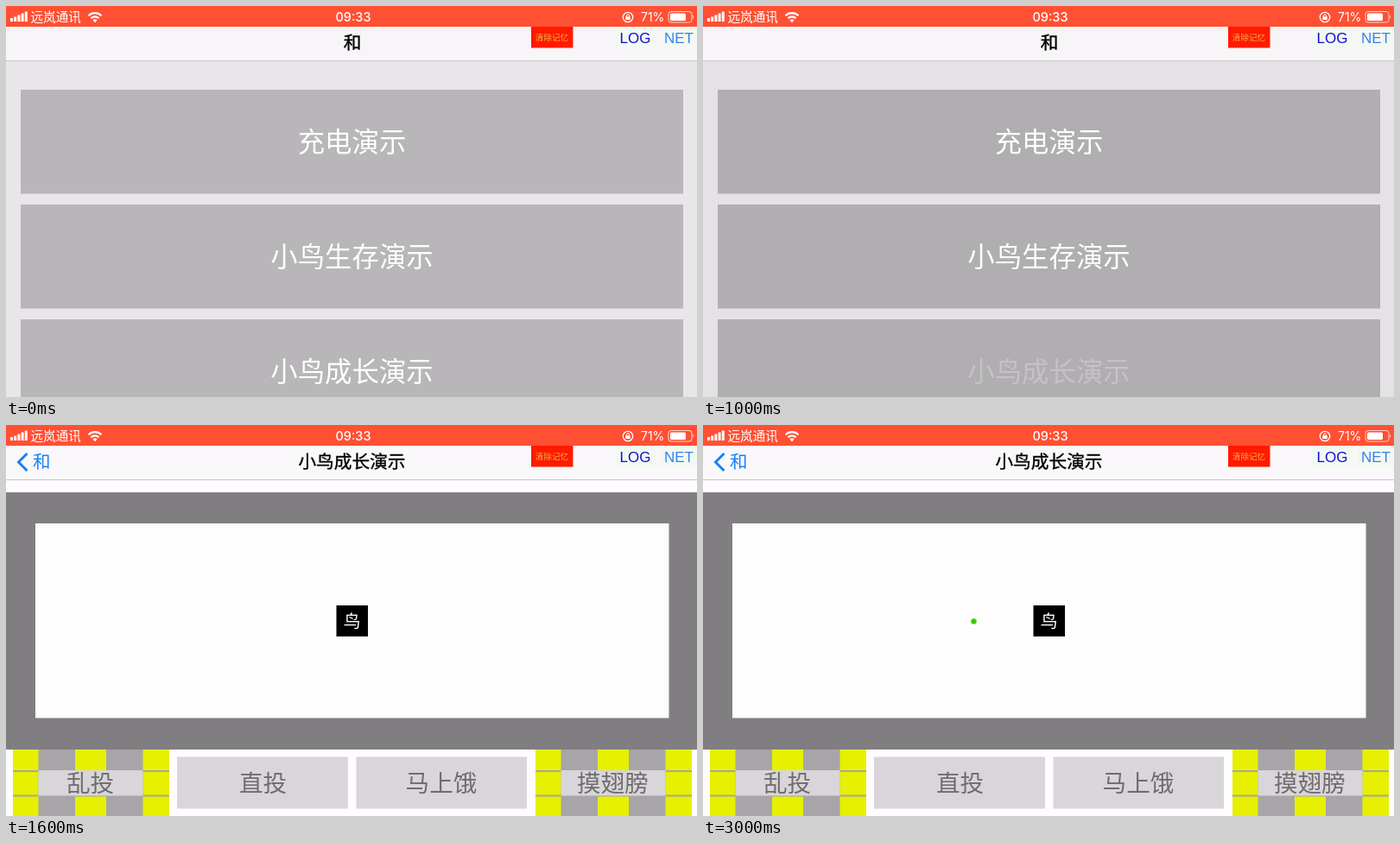
An HTML page for the animation above (8000 ms loop, 800x453 px).

```html
<!DOCTYPE html>
<html lang="zh">
<head>
<meta charset="utf-8">
<title>小鸟成长演示</title>
<style>
  html, body { margin: 0; width: 100%; height: 100%; overflow: hidden; background: #fefcfe; }
  svg { display: block; width: 100%; height: 100%; }
  text { font-family: "Noto Sans CJK SC", "Noto Sans CJK", sans-serif; }
  .mid text, text.mid { text-anchor: middle; }
  .title { font-size: 20.7px; stroke: #000; stroke-width: .35px; }
  .status { font-family: Inter, "Liberation Sans", sans-serif; fill: #fff; }
  .tool { font: 17px "Liberation Sans", sans-serif; }
  .rows text { font-size: 31.4px; fill: #fff; }
  .bar text { font-size: 27.6px; fill: #706c70; }

  .home, .backdrop, .rows, .pressed, .dim, .homeTitle,
  .detail, .detailNav, .detailTitle, .backLabel, .seed {
    animation: 8s step-end infinite;
  }
  .home { animation-name: slideHome; }
  .backdrop { fill: #e8e6e8; animation-name: backdrop; }
  .rows { fill: #b8b6b8; animation-name: rowTone; }
  .rows .pressed { animation-name: press; }
  .dim { animation-name: appear; }
  .homeTitle { animation-name: vanish; }
  .detail { animation-name: appear, slideDetail; }
  .detailNav { animation-name: appear; }
  .detailTitle { animation-name: slideTitle; }
  .backLabel { animation-name: slideBack; }
  .seed { animation-name: throwSeed; }

  @keyframes slideHome { 0% { transform: none; } 15% { transform: translateX(-216px); } }
  @keyframes backdrop { 0% { fill: #e8e6e8; } 12.5%, 100% { fill: #e4e2e4; } }
  @keyframes rowTone { 0% { fill: #b8b6b8; } 12.5%, 100% { fill: #b0aeb0; } }
  @keyframes press { 0% { fill: #fff; } 12.5%, 100% { fill: #c4c2c4; } }
  @keyframes appear { 0% { visibility: hidden; } 15%, 100% { visibility: visible; } }
  @keyframes vanish { 0% { visibility: visible; } 15%, 100% { visibility: hidden; } }
  @keyframes slideDetail { 0%, 15% { transform: translateX(80px); } 17.5%, 100% { transform: none; } }
  @keyframes slideTitle { 0%, 15% { transform: translateX(48px); } 17.5%, 100% { transform: none; } }
  @keyframes slideBack { 0%, 15% { transform: translateX(39px); } 17.5%, 100% { transform: none; } }
  @keyframes throwSeed {
    0% { visibility: hidden; transform: translate(309px, 287px); }
    35% { visibility: visible; transform: translate(309px, 287px); }
    37.5%, 100% { visibility: visible; transform: translate(313.5px, 227.5px); }
  }
</style>
</head>
<body>
<svg viewBox="0 0 800 453" preserveAspectRatio="none">
  <defs>
    <g id="checker">
      <path fill="#a8a5a8" d="M8 376h181v77H8z"/>
      <path fill="#e6f000" d="M8 376h29.5v24H8zm72 0h36v24H80zm78.500 0h30.500v24h-30.500zM8 402h29.500v26.500H8zm150.500 0h30.500v26.500h-30.500zM8 430.500h29.500V453H8zm72 0h36V453H80zm78.500 0h30.500V453h-30.500z"/>
      <path fill="#d8d6d8" d="M37.500 400h121v29.500h-121z"/>
    </g>
  </defs>

  <rect class="backdrop" width="800" height="453"/>
  <g class="home">
    <g class="rows mid">
      <rect x="17" y="97" width="767" height="120.500"/>
      <rect x="17" y="230" width="767" height="120.500"/>
      <rect x="17" y="363" width="767" height="120.500"/>
      <text x="400.500" y="168.500">充电演示</text>
      <text x="400.500" y="301.500">小鸟生存演示</text>
      <text class="pressed" x="400.500" y="434.500">小鸟成长演示</text>
    </g>
  </g>
  <rect class="dim" y="64" width="800" height="389" opacity=".09"/>

  <g class="detail">
    <path fill="#fefcfe" d="M-2 64h804v389H-2z"/>
    <path fill="#817e81" d="M-2 78h804v298H-2z"/>
    <path fill="#fefdfe" d="M34 114h733.500v225.500H34z"/>
    <path d="M382.500 209H419v36h-36.500z"/>
    <text class="mid" x="400.500" y="234.500" font-size="20" fill="#fff">鸟</text>
    <circle class="seed" r="3.200" fill="#3c0"/>
    <g class="bar mid">
      <use href="#checker"/>
      <use href="#checker" x="605"/>
      <path fill="#d8d6d8" d="M198 384.500h198v60H198zm207.500 0h197.500v60H405.500z"/>
      <text x="97.500" y="425">乱投</text>
      <text x="297.500" y="425">直投</text>
      <text x="504" y="425">马上饿</text>
      <text x="702.500" y="425">摸翅膀</text>
    </g>
  </g>

  <path fill="#f7f5f7" d="M0 24h800v39H0z"/>
  <path fill="#c9c6c9" d="M0 63h800v1H0z"/>
  <text class="title mid homeTitle" x="401" y="50">和</text>
  <g class="detailNav">
    <path fill="#faf8fa" d="M0 24h800v39H0z"/>
    <path fill="none" stroke="#1582fa" stroke-width="3" d="M24.500 33 14.500 43l10 10"/>
    <text class="backLabel" x="31" y="50" font-size="20.500" fill="#1582fa">和</text>
    <text class="title mid detailTitle" x="400.500" y="50">小鸟成长演示</text>
  </g>

  <path fill="#f3f9f2" d="M705 25h48v24h-48zm52 0h43v24h-43z"/>
  <text class="tool" x="710.500" y="43" fill="#1210cc">LOG</text>
  <text class="tool" x="762" y="43" fill="#3682ee">NET</text>
  <path fill="#ff1a00" d="M608 24h48.500v24.500H608z"/>
  <text class="mid" x="632" y="40" font-size="9.600" fill="#f5b040">清除记忆</text>

  <path fill="#ff5033" d="M0 0h800v24H0z"/>
  <path fill="#fff" d="M5 14h3v4H5zm4.200-1.500h3V18h-3zm4.200-2h3V18h-3zm4.200-2h3V18h-3zm4.200-2h3V18h-3z"/>
  <text x="28.500" y="18" font-size="14.600" fill="#fff">远岚通讯</text>
  <g fill="none" stroke="#fff" stroke-width="2.200">
    <path d="M95.500 11.200a10.500 10.500 0 0 1 15 0M98.500 14.200a6.500 6.500 0 0 1 9 0"/>
    <path fill="#fff" stroke="none" d="m103 19.200-2.500-2.700a3.500 3.500 0 0 1 5 0z"/>
  </g>
  <text class="status mid" x="402" y="18" font-size="14.500" font-weight="500">09:33</text>
  <g fill="none" stroke="#fff" stroke-width="1.300">
    <circle cx="720" cy="13" r="5.700"/>
    <path d="M718.500 12.500v-1.200a1.500 1.500 0 0 1 3 0v1.200" stroke-width="1"/>
    <path fill="#fff" stroke="none" d="M717.300 12.200h5.400v3.800h-5.400z"/>
    <rect x="767" y="6.500" width="27" height="12.500" rx="3" stroke-width="1" opacity=".75"/>
    <rect x="769" y="8.500" width="18" height="8.500" rx="1.500" fill="#fff" stroke="none"/>
    <path fill="#fff" stroke="none" opacity=".75" d="M795.300 10.500q2 2.200 0 4.500z"/>
  </g>
  <text class="status" x="735" y="18" font-size="14">71%</text>
</svg>
</body>
</html>
```
